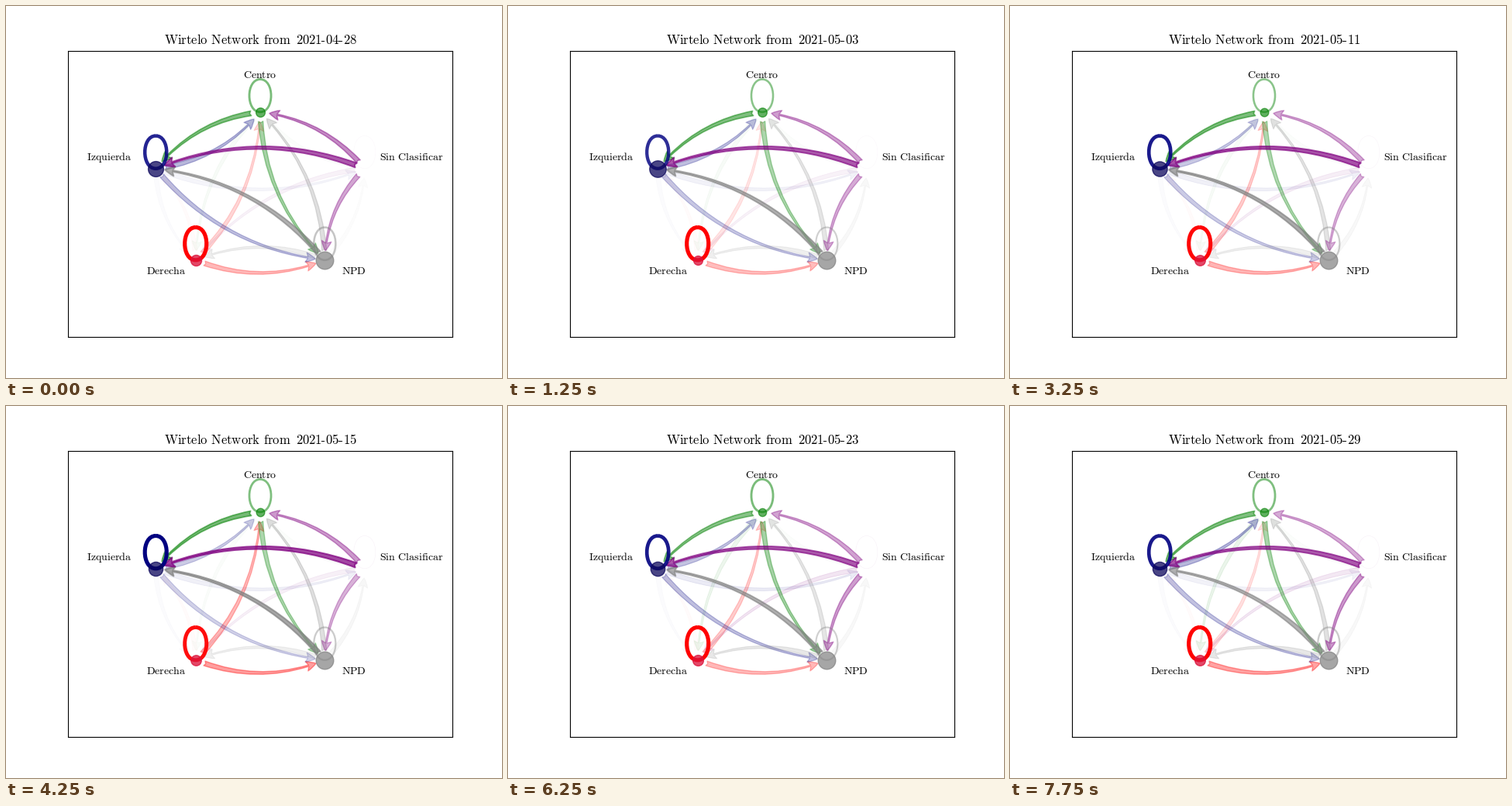
These frames come from a looping animation (640x480 px, 8000 ms). A matplotlib script:

```python
import numpy as np
import matplotlib.pyplot as plt
from matplotlib.animation import FuncAnimation
from matplotlib.patches import ArrowStyle, FancyArrowPatch, PathPatch, Rectangle
from matplotlib.path import Path

plt.rcParams["mathtext.fontset"] = "cm"

W, H, DPI = 640, 480, 100
DAYS, STEP = 32, 250
KEY_DAYS = [0, 5, 10, 17, 21, 25, 31]
SPACE = r"\hspace{0.38}"

COLORS = {"C": "green", "I": "navy", "D": "red", "N": "gray", "S": "purple"}

# Five groups on a circle, counter-clockwise from the top
POS = {
    name: np.array([np.cos(a), np.sin(a)])
    for name, a in zip("CIDNS", np.pi / 2 + np.arange(5) * 2 * np.pi / 5)
}

LABELS = [
    ("Centro", 0, 1.45),
    ("Izquierda", -1.378, 0.448),
    ("Derecha", -0.854, -0.945),
    ("NPD", 0.85, -0.945),
    ("Sin Clasificar", 1.38, 0.448),
]

# Strength of each tie at the key days, first letter to second
TIES = {
    "NS": [.02, .05, .05, .06, .03, .05, .05],
    "CD": [.03, .03, .04, .02, .04, .07, .08],
    "IS": [.04, .05, .06, .06, .04, .08, .05],
    "SD": [.05, .05, .07, .06, .05, .10, .09],
    "DC": [.16, .10, .13, .28, .28, .20, .12],
    "DN": [.28, .26, .22, .38, .35, .28, .36],
    "IC": [.28, .25, .22, .20, .25, .23, .28],
    "IN": [.25, .22, .22, .18, .25, .25, .24],
    "ND": [.13, .12, .13, .12, .10, .18, .19],
    "NC": [.25, .20, .20, .25, .28, .20, .23],
    "CN": [.35, .32, .30, .32, .37, .35, .33],
    "CI": [.50, .50, .50, .54, .55, .47, .50],
    "SN": [.35, .33, .30, .30, .40, .38, .40],
    "SC": [.45, .38, .30, .40, .45, .36, .33],
    "NI": [.62, .63, .64, .70, .67, .63, .60],
    "SI": [.65, .65, .65, .72, .68, .65, .65],
}
FAINT_TIES = {"ID": .015, "DI": .015, "CS": .015}

LOOPS = {
    "C": [.52, .46, .43, .50, .55, .52, .50],
    "I": [.86, .82, .82, 1, 1, .90, .90],
    "D": [1, 1, 1, .95, 1, 1, 1],
    "N": [.45, .37, .38, .40, .45, .37, .40],
    "S": [.03, .03, .04, .05, .04, .05, .05],
}

# Disc colour, opacity and radius in pixels at the key days
DISCS = {
    "C": ("green", .62, [6.6, 6.5, 6, 6, 6.3, 5.8, 6]),
    "I": ((.05, .03, .36), .75, [10.6, 11.4, 10.7, 9.8, 9.6, 9.9, 9.8]),
    "D": ("crimson", .78, [7.7, 6.6, 7.5, 7.4, 7.1, 7.6, 7.5]),
    "N": ("gray", .7, [12] * 7),
}


def at_day(values, day):
    return np.interp(day, KEY_DAYS, values)


def roman(text):
    return r"$\mathrm{" + text.replace(" ", SPACE) + "}$"


def disc_area(radius):
    return (2 * (radius - 0.7) * 72 / DPI) ** 2


def add_tie(pair):
    start, end = pair
    style = ArrowStyle.Fancy(head_length=.45, head_width=.45, tail_width=.22)
    return ax.add_patch(FancyArrowPatch(
        POS[start], POS[end], arrowstyle=style, mutation_scale=20,
        connectionstyle="arc3,rad=0.2", shrinkA=8.66, shrinkB=8.66,
        color=COLORS[start]))


def add_loop(name):
    w, h = 0.132, 0.4
    shape = [(0, h), (w, h), (w, 0), (0, 0), (-w, 0), (-w, h), (0, h)]
    path = Path(POS[name] + np.array(shape), [Path.MOVETO] + [Path.CURVE4] * 6)
    return ax.add_patch(PathPatch(path, fill=False, edgecolor=COLORS[name]))


def add_disc(name):
    color, alpha, _ = DISCS[name]
    return ax.scatter(*POS[name], color=color, alpha=alpha, linewidths=1, zorder=2)


def add_title_part(x, text="", ha="left"):
    return fig.text(x / W, 430.7 / H, text, size=12, ha=ha, va="baseline")


def add_hyphen(x):
    fig.add_artist(Rectangle((x / W, 434 / H), 4.4 / W, 1 / H, color="black", lw=0))


fig = plt.figure(figsize=(W / DPI, H / DPI), dpi=DPI, facecolor="white")
ax = fig.add_axes([0.125, 0.11, 0.775, 0.77])
ax.set(xlim=(-1.75, 1.75), ylim=(-1.75, 1.75), xticks=[], yticks=[])

for text, x, y in LABELS:
    ax.text(x, y, roman(text), size=10, ha="center", va="center", zorder=3)

add_title_part(367.9, roman("Wirtelo Network from"), "right")
add_title_part(373.5, roman("2021"))
month = add_title_part(412.4)
date = add_title_part(434.6)
add_hyphen(407)
add_hyphen(429.3)

for pair, strength in FAINT_TIES.items():
    add_tie(pair).set(alpha=strength, linewidth=0.6)
ties = {pair: add_tie(pair) for pair in TIES}
loops = {name: add_loop(name) for name in LOOPS}
discs = {name: add_disc(name) for name in DISCS}


def update(day):
    number = 28 + day
    in_april = number <= 30
    month.set_text(roman("04" if in_april else "05"))
    date.set_text(roman(f"{number if in_april else number - 30:02d}"))
    for pair, arrow in ties.items():
        strength = at_day(TIES[pair], day)
        arrow.set(alpha=strength, linewidth=0.6 + 1.2 * strength)
    for name, loop in loops.items():
        strength = at_day(LOOPS[name], day)
        loop.set(alpha=strength, linewidth=0.3 + 3.4 * strength)
    for name, disc in discs.items():
        disc.set_sizes([disc_area(at_day(DISCS[name][2], day))])
    return []


anim = FuncAnimation(fig, update, frames=DAYS, interval=STEP,
                     repeat=True, repeat_delay=0, blit=False)
plt.show()
```
